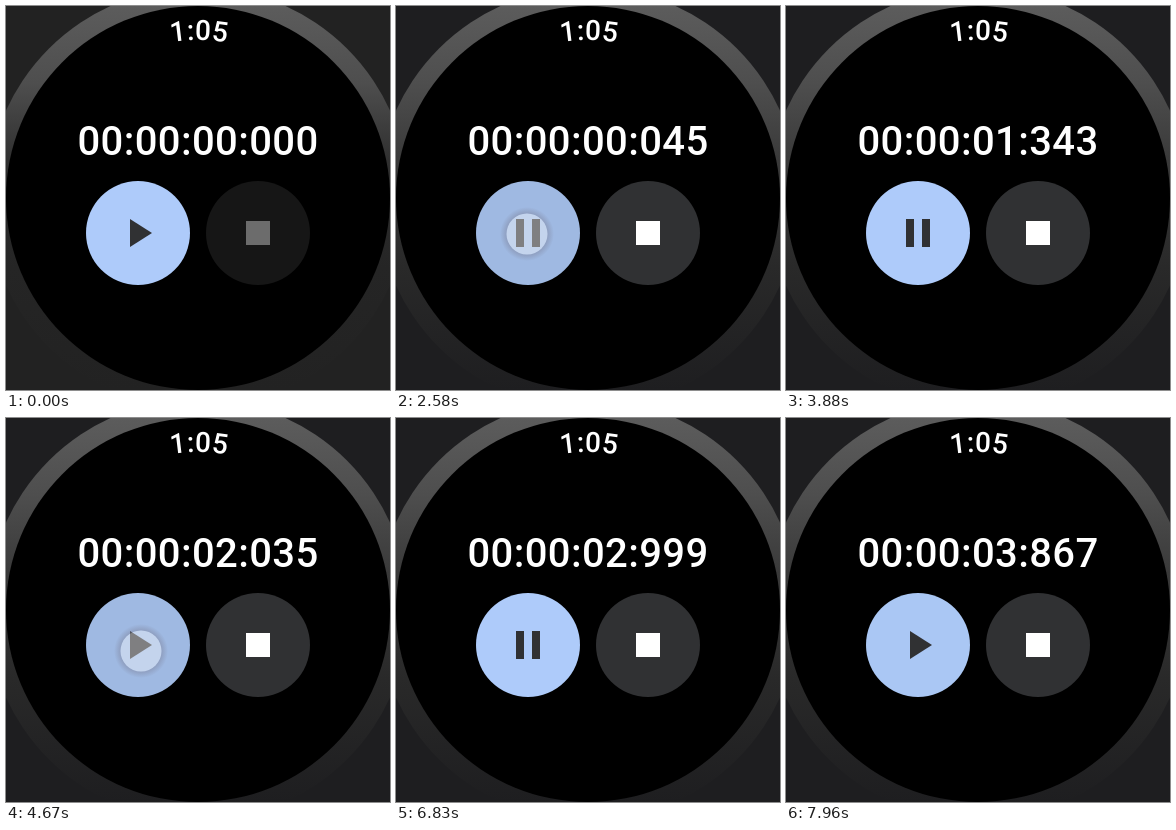
Recreate the animation shown at these times as an HTML page with a canvas. Size 384x384 px, loop 8 s.

```html
<!DOCTYPE html>
<html lang="en">
<head>
<meta charset="utf-8">
<title>Stopwatch</title>
<style>
html, body { margin: 0; width: 100%; height: 100%; overflow: hidden; background: #1e1e20; }
canvas { display: block; width: 100vmin; height: 100vmin; }
</style>
</head>
<body>
<canvas width="384" height="384"></canvas>
<script>
const ctx = document.querySelector('canvas').getContext('2d');
const LOOP = 8000, STEP = 1000 / 24, C = 192;
const PLAY = { x: 132, y: 227, r: 52 }, STOP = { x: 252, y: 227, r: 52 };
const PRIMARY = [174, 203, 250], SURFACE = [48, 49, 51];
const STARTED = 2535, PAUSED = 4573, RESUMED = 5866, ENDED = 7698;
const TAPS = [
  { at: STARTED, x: 131, y: 228 },
  { at: PAUSED, x: 135, y: 233 },
  { at: RESUMED, x: 132, y: 229 },
  { at: ENDED, x: 133, y: 230 }
];
const clamp = v => Math.max(0, Math.min(1, v));
const rgb = c => `rgb(${c.map(Math.round).join(',')})`;
const gray = v => rgb([v, v, v]);
const mix = (a, b, k) => a.map((v, i) => v + (b[i] - v) * k);
const pad = (n, w) => String(n).padStart(w, '0');

function disc(x, y, r, fill) {
  ctx.fillStyle = fill;
  ctx.beginPath();
  ctx.arc(x, y, r, 0, Math.PI * 2);
  ctx.fill();
}

function elapsed(t) {
  if (t < STARTED) return 0;
  if (t < RESUMED) return Math.min(2035, Math.round(45 + (t - 2580) * 1298 / 1300));
  return Math.min(3867, 2035 + t - RESUMED);
}

function timeText(ms) {
  const s = Math.floor(ms / 1000);
  return [pad(Math.floor(s / 3600), 2), pad(Math.floor(s / 60) % 60, 2), pad(s % 60, 2), pad(ms % 1000, 3)].join(':');
}

function setFont(size, spacing) {
  ctx.font = `500 ${size}px Roboto, sans-serif`;
  ctx.letterSpacing = `${spacing}px`;
}

function curvedText(text, radius) {
  const widths = [...text].map(ch => ctx.measureText(ch).width);
  let pos = 1 - widths.reduce((a, b) => a + b) / 2;
  [...text].forEach((ch, i) => {
    ctx.save();
    ctx.translate(C, C);
    ctx.rotate((pos + widths[i] / 2) / radius);
    ctx.fillText(ch, 0, -radius);
    ctx.restore();
    pos += widths[i];
  });
}

function drawBezel(haze) {
  const back = [30 + 4 * haze, 30 + 4 * haze, 32 + 2 * haze];
  ctx.fillStyle = rgb(back);
  ctx.fillRect(0, 0, 384, 384);
  const g = ctx.createLinearGradient(0, 0, 0, 384);
  g.addColorStop(0, gray(92));
  g.addColorStop(0.2, gray(78));
  g.addColorStop(0.4, gray(58 - 10 * haze));
  g.addColorStop(0.68, gray(41 - 4 * haze));
  g.addColorStop(1, rgb(back));
  disc(C, C, 211, g);
  disc(C, C, 192, '#000');
}

function drawIcon(running) {
  const { x, y } = PLAY;
  ctx.fillStyle = rgb(SURFACE);
  if (running) {
    ctx.fillRect(x - 12, y - 14, 8, 28);
    ctx.fillRect(x + 4, y - 14, 8, 28);
    return;
  }
  ctx.beginPath();
  ctx.moveTo(x - 8, y - 14);
  ctx.lineTo(x + 14, y);
  ctx.lineTo(x - 8, y + 14);
  ctx.fill();
}

function drawTouch({ x, y }, alpha) {
  ctx.save();
  ctx.globalAlpha = alpha;
  const g = ctx.createRadialGradient(x, y, 20, x, y, 27);
  g.addColorStop(0, 'rgba(125,130,155,.5)');
  g.addColorStop(1, 'rgba(125,130,155,0)');
  ctx.fillStyle = g;
  ctx.beginPath();
  ctx.arc(x, y, 27, 0, Math.PI * 2);
  ctx.arc(x, y, 20.5, 0, Math.PI * 2, true);
  ctx.fill();
  disc(x, y, 20.5, 'rgba(255,255,255,.38)');
  ctx.restore();
}

function draw(t) {
  const haze = clamp(1 - t / 830);
  const running = (t >= STARTED && t < PAUSED) || (t >= RESUMED && t < ENDED);
  const active = t >= STARTED;

  drawBezel(haze);

  ctx.fillStyle = '#fff';
  ctx.textAlign = 'center';
  ctx.textBaseline = 'alphabetic';
  setFont(28, 0.2);
  curvedText('1:05', 158);
  setFont(40, 0.4);
  ctx.fillText(timeText(elapsed(t)), C, 149);

  // The press shade outlasts the touch dot.
  const touches = TAPS.map(tap => {
    const d = t - tap.at, press = clamp((d + 120) / 80);
    return { ...tap, shade: press * clamp((300 - d) / 160), alpha: press * clamp((200 - d) / 100) };
  });
  const shade = Math.max(...touches.map(p => p.shade));
  disc(PLAY.x, PLAY.y, PLAY.r, rgb(mix(PRIMARY, SURFACE, 0.12 * shade)));
  drawIcon(running);

  disc(STOP.x, STOP.y, STOP.r, active ? rgb(SURFACE) : gray(22));
  ctx.fillStyle = active ? '#fff' : gray(108);
  ctx.fillRect(STOP.x - 12, STOP.y - 12, 24, 24);

  touches.filter(p => p.alpha > 0).forEach(p => drawTouch(p, p.alpha));
}

const origin = performance.now();
function tick() {
  const t = Math.max(0, performance.now() - origin) % LOOP;
  const frame = Math.floor((t + 5) / STEP);
  draw(Math.round(frame * STEP / 10) * 10 % LOOP);
  requestAnimationFrame(tick);
}
tick();
</script>
</body>
</html>
```
